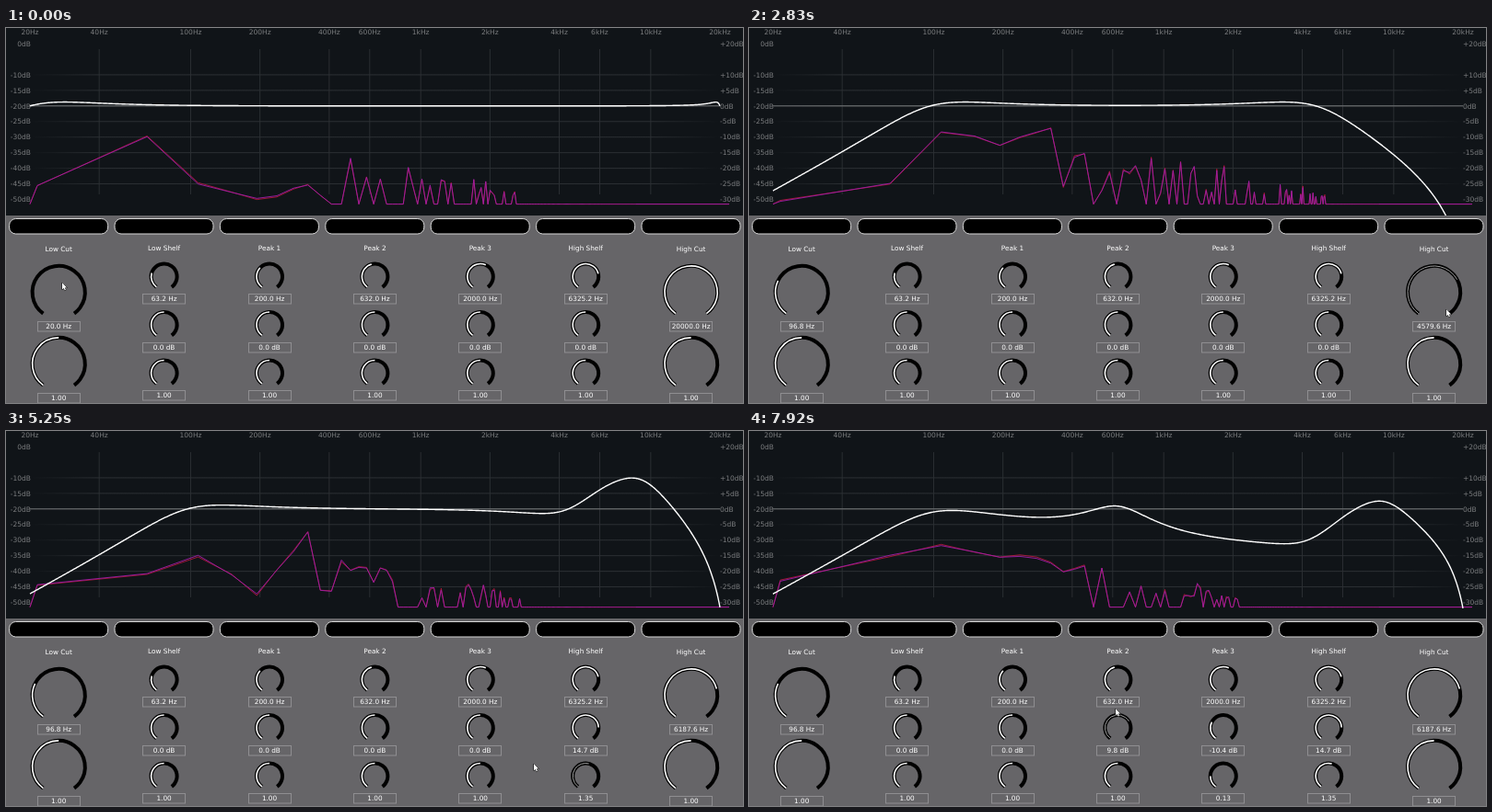
Animation, 800 px wide and 408 px high, one loop 8000 ms. Source, as an HTML page with a canvas:

```html
<!DOCTYPE html>
<html lang="en">
<head>
<meta charset="utf-8">
<title>Equalizer</title>
<style>
  html, body { margin: 0; width: 100%; height: 100%; overflow: hidden; background: #666568; }
  canvas { display: block; }
</style>
</head>
<body>
<canvas id="stage" width="800" height="408"></canvas>
<script>
const ctx = document.getElementById('stage').getContext('2d');
const LOOP = 8000, STEP = 1000 / 12, SAMPLE_RATE = 44100;
const PANEL = '#666568', GRID = '#2b2f33', LABEL = '#7b7d7f';
const FLOOR = 191.6, ZERO_Y = 84.8, DB = 3.39, BINS = 200;

const clamp = (v, lo, hi) => Math.min(hi, Math.max(lo, v));
const mix = (a, b, u) => a + (b - a) * u;
const freqX = f => 26 + 749 * Math.log10(f / 20) / 3;
const xFreq = x => 20 * 10 ** ((x - 26) / 749 * 3);
const binX = k => freqX(SAMPLE_RATE / 1024 * (k + 0.5));
const random = (a, b) => {
  const s = Math.sin(a * 127.1 + b * 311.7 + 7) * 43758.5453;
  return s - Math.floor(s);
};

// Value range whose given middle value sits at the centre of the knob.
function range(lo, hi, middle, show) {
  const skew = Math.log(0.5) / Math.log((middle - lo) / (hi - lo));
  return {
    norm: v => ((v - lo) / (hi - lo)) ** skew,
    value: n => lo + (hi - lo) * n ** (1 / skew),
    show
  };
}
const FREQ = range(20, 20000, 1000, v => v.toFixed(1) + ' Hz');
const GAIN = range(-24, 24, 0, v => v.toFixed(1).replace('-0.0', '0.0') + ' dB');
const QUALITY = range(0.1, 10, 1, v => v.toFixed(2));

// Animated controls are lists of [time, value].
const fixed = v => [[0, v]];
const cut = (name, type, freq) => ({ name, type, freq, q: fixed(1) });
const bell = (name, type, freq, gain = fixed(0), q = fixed(1)) => ({ name, type, freq: fixed(freq), gain, q });
const bands = [
  cut('Low Cut', 'lowCut', [[300, 20], [1450, 96.8]]),
  bell('Low Shelf', 'lowShelf', 63.2),
  bell('Peak 1', 'peak', 200),
  bell('Peak 2', 'peak', 632, [[7420, 0], [7920, 9.8]]),
  bell('Peak 3', 'peak', 2000, [[6120, 0], [6580, -7.1], [6900, -10.4]], [[5580, 1], [5960, 0.13]]),
  bell('High Shelf', 'highShelf', 6325.2, [[3500, 0], [4080, 13.8], [4170, 14.7]], [[4600, 1], [5080, 1.35]]),
  cut('High Cut', 'highCut', [[1850, 20000], [2000, 13713.2], [2470, 500], [2830, 4579.6], [3000, 6187.6]])
];

const pointerPath = [
  [300, 61, 277], [1450, 72, 258], [1750, 771, 293], [1850, 771, 293], [2000, 768, 297],
  [2470, 758, 335], [2830, 757, 306], [3200, 757, 302], [3450, 630, 297], [4080, 629, 269],
  [4600, 629, 370], [5080, 628, 364], [5250, 573, 362], [5580, 515, 373], [5960, 503, 393],
  [6120, 514, 330], [6580, 510, 345], [7000, 509, 349], [7400, 399, 326], [7920, 398, 302]
];

function along(path, t, convert = v => v) {
  const i = path.findIndex(p => p[0] > t);
  if (i === 0) return path[0].slice(1).map(convert);
  if (i < 0) return path[path.length - 1].slice(1).map(convert);
  const [a, b] = [path[i - 1], path[i]], u = (t - a[0]) / (b[0] - a[0]);
  return a.slice(1).map((v, j) => mix(convert(v), convert(b[j + 1]), u));
}
const control = (track, kind, t) => kind.value(along(track, t, kind.norm)[0]);

// The music's bass outline over time: [time, highest sounding bin, heights at the bass bins].
const bassBins = [0, 1, 2, 4, 7];
const music = [
  [0, 65, 170, 118, 169, 187, 171],
  [2000, 32, 165, 130, 143, 146, 190],
  [2830, 117, 187, 170, 114, 126, 107],
  [4080, 185, 169, 136, 107, 98, 110],
  [5250, 67, 165, 153, 137, 175, 109],
  [6580, 24, 154, 133, 137, 132, 123],
  [7920, 51, 165, 135, 124, 136, 143]
];

function spectrum(t, frame) {
  const [reach, ...bass] = along(music, t);
  const outline = bassBins.map((bin, i) => [bin, bass[i]]);
  return Array.from({ length: BINS }, (_, k) => {
    if (k <= 7) return Math.min(FLOOR, along(outline, k)[0] + (random(frame, k) - 0.5) * 5);
    const fade = 1 - k / reach;
    const sounds = fade > 0 && random(k, frame) < 0.3 + 0.6 * Math.exp(-k / 20);
    return sounds ? FLOOR - (8 + 52 * fade * random(frame, k)) : FLOOR;
  });
}

// Squared magnitude of re + j*im.
const power = (re, im) => re * re + im * im;
const warp = f => Math.tan(Math.PI * f / SAMPLE_RATE);

function bandDecibels({ type, freq, gain, q }, f) {
  const w = warp(f) / warp(freq), w2 = w * w;
  const A = 10 ** (gain / 40), slope = Math.sqrt(A) * w / q;
  const plain = power(1 - w2, w / q);
  const ratio = {
    lowCut: () => w2 * w2 / plain,
    highCut: () => 1 / plain,
    peak: () => power(1 - w2, w * A / q) / power(1 - w2, w / (A * q)),
    lowShelf: () => A * A * power(A - w2, slope) / power(1 - A * w2, slope),
    highShelf: () => A * A * power(1 - A * w2, slope) / power(A - w2, slope)
  }[type]();
  return 10 * Math.log10(ratio);
}

function text(str, x, y, color, size, align = 'center') {
  ctx.font = `${size}px "DejaVu Sans", sans-serif`;
  ctx.textAlign = align;
  ctx.fillStyle = color;
  ctx.fillText(str, x, y + size * 0.365);
}

function polyline(points, color, width) {
  ctx.beginPath();
  points.forEach(([x, y]) => ctx.lineTo(x, y));
  ctx.strokeStyle = color;
  ctx.lineWidth = width;
  ctx.lineJoin = 'round';
  ctx.stroke();
}

function drawGrid() {
  ctx.fillStyle = '#101418';
  ctx.fillRect(0, 0, 800, 204);
  for (const f of [20, 40, 100, 200, 400, 600, 1000, 2000, 4000, 6000, 10000, 20000]) {
    const x = freqX(f);
    text(f < 1000 ? f + 'Hz' : f / 1000 + 'kHz', x, 4.5, LABEL, 7.5);
    ctx.fillStyle = GRID;
    if (f > 20 && f < 20000) ctx.fillRect(x - 0.5, 23, 1, 158);
  }
  const fade = ctx.createLinearGradient(26, 0, 775, 0);
  [0, 0.1, 0.9, 1].forEach((p, i) => fade.addColorStop(p, i % 3 ? GRID : GRID + '00'));
  for (let db = 0; db >= -50; db -= 5) {
    if (db === -5) continue;
    const y = 17 - db * DB, right = db + 20;
    text(db + 'dB', 27, y, LABEL, 7.5, 'right');
    text((right > 0 ? '+' : '') + right + 'dB', 775, y, LABEL, 7.5, 'left');
    ctx.fillStyle = fade;
    if (db < 0 && db > -50) ctx.fillRect(26, y - 0.5, 749, 1);
  }
  ctx.fillStyle = '#77797b';
  ctx.fillRect(26, ZERO_Y - 0.5, 749, 1);
}

function drawPlot(t, frame, settings) {
  ctx.save();
  ctx.beginPath();
  ctx.rect(0, 0, 800, 204);
  ctx.clip();
  const levels = spectrum(t, frame);
  const trace = spread => [[26, FLOOR], ...levels.map((y, k) =>
    [binX(k), y < FLOOR ? Math.min(FLOOR, y + (random(k, frame + 0.5) - 0.5) * spread) : FLOOR]), [785, FLOOR]];
  polyline(trace(4), '#c0183e', 0.8);
  polyline(trace(0), '#a01fa9', 0.9);

  const curve = [];
  for (let x = 26; x <= 775; x++) {
    const db = settings.reduce((sum, s) => sum + bandDecibels(s, xFreq(x)), 0);
    curve.push([x, clamp(ZERO_Y - db * DB, 0, 400)]);
  }
  polyline(curve, '#fff', 1.4);
  ctx.restore();
}

function drawKnob(x, y, radius, position, active) {
  const start = -1.3 * Math.PI;
  const arc = (share, color, width) => {
    ctx.beginPath();
    ctx.arc(x, y, radius, start, start + share * 1.6 * Math.PI);
    ctx.strokeStyle = color;
    ctx.lineWidth = width;
    ctx.stroke();
  };
  arc(1, '#000', 4);
  if (position > 0) arc(position, active ? '#a0a0a0' : '#fff', active ? 1 : 1.6);
}

function drawControl(x, y, big, kind, value, active) {
  drawKnob(x, y, big ? 28.6 : 14, kind.norm(value), active);
  const boxY = y + (big ? 37 : 24);
  ctx.strokeStyle = '#8f8e91';
  ctx.lineWidth = 1;
  ctx.strokeRect(Math.round(x - 23.5) + 0.5, Math.round(boxY - 5.5) + 0.5, 46, 10.5);
  text(kind.show(value), x, boxY, '#fff', 7.3);
}

function drawBand(band, s, i, t) {
  const x = 57.2 + 114.4 * i, big = !band.gain;
  ctx.beginPath();
  ctx.roundRect(x - 53.6, 207.5, 107, 16.5, 7);
  ctx.fillStyle = '#000';
  ctx.fill();
  ctx.strokeStyle = '#d8d8d8';
  ctx.lineWidth = 1;
  ctx.stroke();
  text(band.name, x, big ? 240.5 : 239, '#fff', 7.3);

  const held = track => track.length > 1 && t >= track[0][0] - 60 && t <= track[track.length - 1][0] + 170;
  const rows = big
    ? [['freq', FREQ, 287.5], ['q', QUALITY, 365.5]]
    : [['freq', FREQ, 270.5], ['gain', GAIN, 323], ['q', QUALITY, 375.5]];
  rows.forEach(([key, kind, y]) => drawControl(x, y, big, kind, s[key], held(band[key])));
}

function drawPointer(x, y) {
  ctx.beginPath();
  [[0, 0], [0, 7.6], [1.7, 6.1], [2.8, 8.6], [4, 8.1], [2.9, 5.6], [5.2, 5.4]]
    .forEach(([dx, dy]) => ctx.lineTo(x + dx, y + dy));
  ctx.closePath();
  ctx.strokeStyle = '#000';
  ctx.lineWidth = 1;
  ctx.stroke();
  ctx.fillStyle = '#fff';
  ctx.fill();
}

function draw(now) {
  const frame = Math.floor(((now % LOOP) + 5) / STEP) % 96;
  const t = Math.round(frame * STEP / 10) * 10;
  const settings = bands.map(b => ({
    type: b.type,
    freq: control(b.freq, FREQ, t),
    gain: b.gain ? control(b.gain, GAIN, t) : 0,
    q: control(b.q, QUALITY, t)
  }));
  ctx.fillStyle = PANEL;
  ctx.fillRect(0, 0, 800, 408);
  drawGrid();
  drawPlot(t, frame, settings);
  bands.forEach((b, i) => drawBand(b, settings[i], i, t));
  drawPointer(...along(pointerPath, t));
}

const begin = performance.now();
function tick() {
  draw(performance.now() - begin);
  requestAnimationFrame(tick);
}
tick();
</script>
</body>
</html>
```
